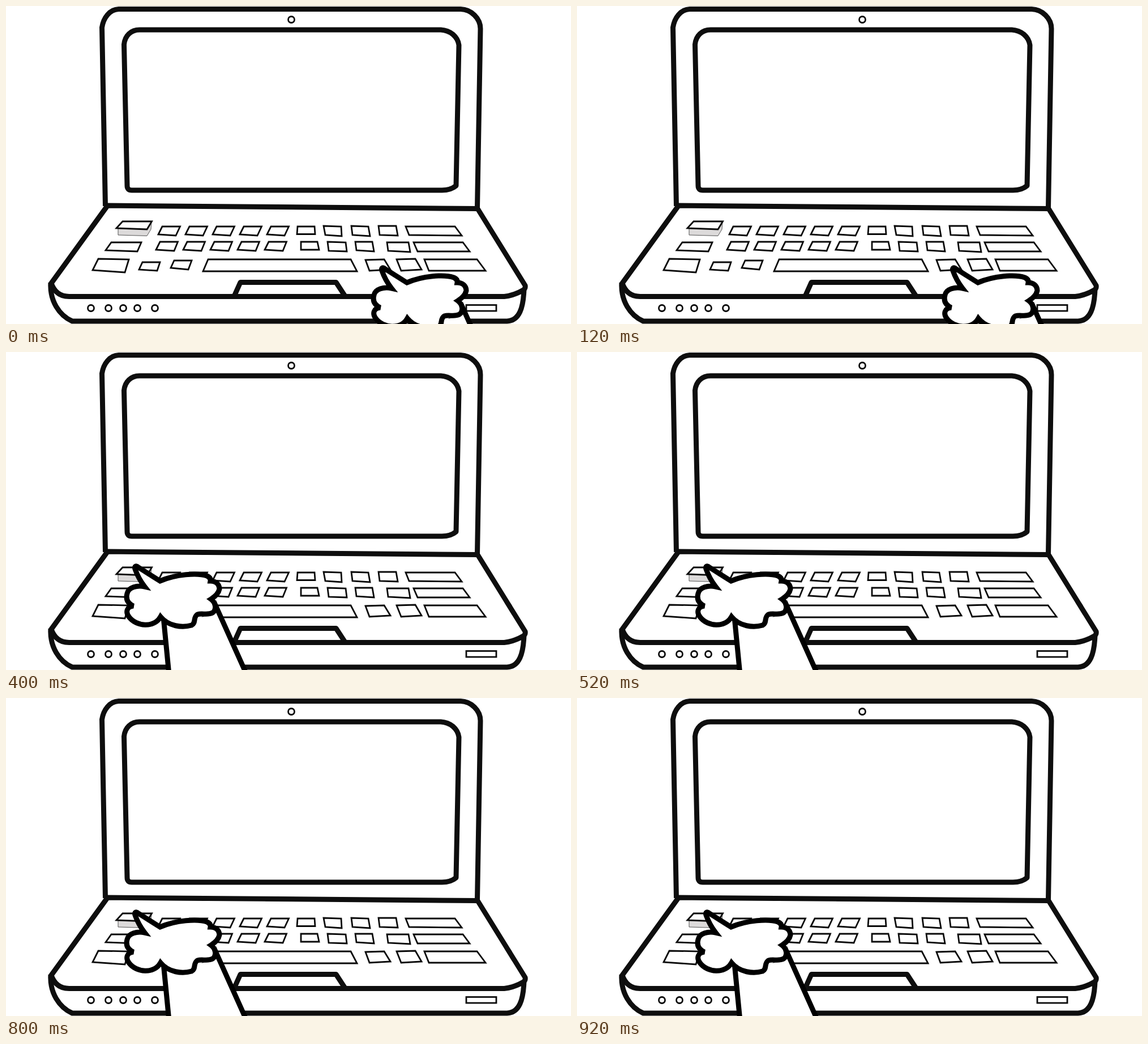
An HTML page that plays this animation: 998x561 px, repeating every 1 s.

```html
<!DOCTYPE html>
<html lang="en">
<head>
<meta charset="utf-8">
<title>Typing hand</title>
<style>
  html, body { margin: 0; width: 100%; height: 100%; overflow: hidden; background: #fff; }
  svg { display: block; width: 100%; height: 100%; }
  .case { fill: none; stroke: #0e0e0e; stroke-width: 9; stroke-linejoin: round; }
  .thin { fill: #fff; stroke: #0a0a0a; stroke-width: 2.8; }
  .hand { fill: #fff; stroke: #000; stroke-width: 9; stroke-miterlimit: 4; }
</style>
</head>
<body>
<svg viewBox="0 0 998 561">
  <g class="case">
    <path d="M175.5 353L169.5 38C172 21 183 6 199 5.500H803C822 6 838 22 838 40L832.500 356"/>
    <path d="M208.500 68C210 52 221 42 236 42H768C785 43 798 54 800 69L795 317C788 323 780 325 770 325H222Q214 325 214 317Z"/>
    <path d="M177 352L833 357.500L917 493Q918 498 914 501Q897 511 880 512.500H113C95 513 85 504 80 489L178 354"/>
    <path d="M79 488C77 520 94 546 117 556H885C907 555 914 532 915 499"/>
    <path d="M403 512L414 487.500H583L599 512"/>
  </g>
  <g class="thin" id="details">
    <circle cx="504" cy="24" r="5.500"/>
    <rect x="813" y="527.500" width="53" height="10.500"/>
  </g>
  <g class="thin" id="keys"></g>
  <path id="side" d="M198 392L249 394L257 380L256 394L249 405.500L198 404Z" fill="#dcdada" stroke="#555" stroke-width="1"/>
  <polygon id="cap" class="thin"/>
  <g class="hand" id="hand">
    <path d="M278 467L291 600H439L367 440"/>
    <path id="fist"/>
    <path d="M345 468L351 463L354 465Z" stroke="none" style="fill:#000"/>
  </g>
</svg>
<script>
const NS = "http://www.w3.org/2000/svg";
const $ = id => document.getElementById(id);

function add(parent, tag, attrs) {
  const el = document.createElementNS(NS, tag);
  for (const k in attrs) el.setAttribute(k, attrs[k]);
  parent.appendChild(el);
}

// Each key is given by its four corners, clockwise from top left.
const rows = [
  ["515,389 545,389 546,402.5 514,402.5", "561,388 592,389 593,406 564,404",
   "610,388 640,389 643,406 612,404", "658,388 689,388 692,405 660,404",
   "706,389 793,389 805,405 712,404"],
  ["186,417 239,417 232,433 176,431", "521,416 550,416 553,430 521,430",
   "568,416 600,417 602,433 570,432", "617,416 647,416 650,433 619,431",
   "673,417 711,417 714,434 675,432", "720,417 807,417 819,433 727,433"],
  ["163,446 217,447 210,470 153,466", "241,452 272,452 267,467 235,465",
   "297,449 328,449 322,465 291,462", "357,447 609,447 620,468 348,468",
   "635,448 668,447 679,465 642,467", "690,447 723,446 734,465 698,467",
   "739,447 832,447 847,467 747,467"]
];
rows.flat().forEach(points => add($("keys"), "polygon", { points }));

for (let i = 0; i < 5; i++) {
  const transform = `translate(${i * 48} 0)`;
  add($("keys"), "polygon", { points: "276,389 307.5,389 300,405 269,403", transform });
  add($("keys"), "polygon", { points: "272,416 303.5,416 297,432 265,430", transform });
}
for (const cx of [150, 181, 207, 232, 263]) {
  add($("details"), "circle", { cx, cy: 533, r: 5.5 });
}

const palm = "C300 392 338 389 355 395Q362 398 361 404" +
  "C372 404 377 411 377 418Q375 428 362 436" +
  "C370 442 373 454 365 460C355 465 347 460 338 463C330 468 336 478 328 482" +
  "C311 487 287 484 273 467C262 487 230 485 217 467C211 459 213 449 225 448" +
  "C216 444 211 437 214 426C216 415 232 411 245 414";
const straight = "M272 404" + palm + "Q234 400 228 383C226 378 230 376 234 380L272 404";
const bent = "M272 404" + palm + "C240 400 230 396 224 389C218 382 226 382 232 384C249 389 261 398 272 404";

const raised = "206,380 257.500,380 249,394 195,392";
const lowered = "206,385 257.500,385 249,399.500 195,398";

const stops = [[436, 84], [250, 25], [0, 0]];

function draw(ms) {
  const step = Math.floor((ms % 1000) / 200);
  const pressed = step === 3;
  const [x, y] = stops[Math.min(step, 2)];
  $("hand").setAttribute("transform", `translate(${x} ${y})`);
  $("fist").setAttribute("d", (pressed ? bent : straight) + "Z");
  $("cap").setAttribute("points", pressed ? lowered : raised);
  $("side").setAttribute("visibility", pressed ? "hidden" : "visible");
}

let start;
function tick(now) {
  start ??= now;
  draw(now - start);
  requestAnimationFrame(tick);
}
draw(0);
requestAnimationFrame(tick);
</script>
</body>
</html>
```
